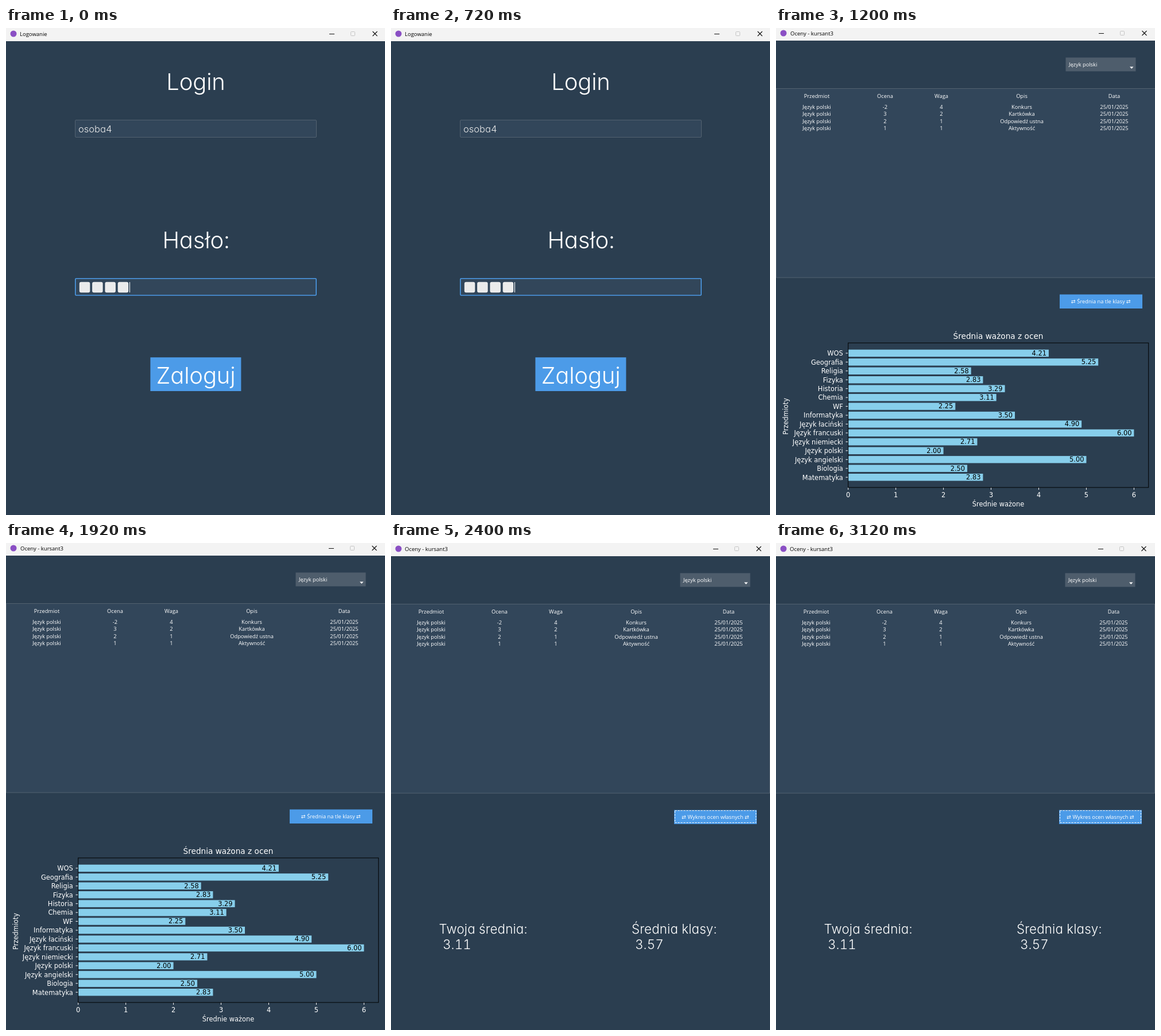
These frames come from a looping animation (660 px wide and 849 px high, 3.6 s). An HTML page:

```html
<!DOCTYPE html>
<html lang="pl">
<head>
<meta charset="utf-8">
<style>
html, body { margin: 0; width: 100%; height: 100%; overflow: hidden; background: #2b3e50; }
svg { display: block; width: 660px; height: 849px; }
text { fill: #fff; font: 9.3px "Open Sans", "Noto Sans", "DejaVu Sans", sans-serif; }
.mid { text-anchor: middle; }
.end { text-anchor: end; }
.geo { font-family: Inter, sans-serif; font-weight: 300; font-feature-settings: "cv11", "tnum"; }
.big { font-size: 40px; letter-spacing: -.004em; }
.field { font-size: 16.5px; fill: #ebebeb; }
.avg { font-size: 22.3px; letter-spacing: .008em; }
.plot { font: 11.4px "DejaVu Sans", sans-serif; }
.head { font-size: 13.65px; }
.dark { fill: #000; }
.caption { font-size: 9.5px; fill: #000; }
.box { fill: #32465a; stroke: #526170; }
</style>
</head>
<body>
<svg id="stage" viewBox="0 0 660 849"></svg>
<script>
const BLUE = '#4c9be8';
const text = (x, y, str, cls = '') => `<text x="${x}" y="${y}" class="${cls}">${str}</text>`;
const rect = (x, y, w, h, attrs) => `<rect x="${x}" y="${y}" width="${w}" height="${h}" ${attrs}/>`;
const line = (d, color, attrs = '') => `<path d="${d}" stroke="${color}" fill="none" ${attrs}/>`;

// right: x of the close cross centre, mid: y of the bar's centre line
function titleBar(label, x, right, mid) {
  return rect(0, 0, 660, mid + 12.5, 'fill="#f3f3f3"') +
    `<circle cx="13" cy="${mid - .5}" r="5.5" fill="#8a4fc4"/>` +
    text(x, mid + 3.5, label, 'caption') +
    line(`M${right - 79.5} ${mid}h9`, '#111') +
    rect(right - 42, mid - 4, 7, 7, 'rx="1" fill="none" stroke="#c4c4c4"') +
    line(`M${right - 4} ${mid - 4.5}l8 8m0-8l-8 8`, '#111', 'stroke-width="1.1"');
}

function login() {
  let out = titleBar('Logowanie', 24, 642.5, 10.5) +
    text(330.5, 108, 'Login', 'geo big mid') +
    rect(120.5, 160.5, 420, 30, 'rx="1.5" class="box"') +
    text(126, 182, 'osoba4', 'geo field') +
    text(331, 384, 'Hasło:', 'geo big mid') +
    rect(120.8, 436.8, 419.4, 29.2, `rx="1.5" fill="#32465a" stroke="${BLUE}" stroke-width="1.6"`);
  for (let i = 0; i < 4; i++)
    out += rect(127.8 + 22.3 * i, 442.8, 18.5, 18.5, 'rx="3" fill="#ebebeb"');
  return out + line('M215.5 443v18', '#fff') +
    rect(251.4, 574.2, 158, 58.8, `fill="${BLUE}"`) +
    text(330.5, 620, 'Zaloguj', 'geo big mid');
}

function grades(button) {
  const columns = [71, 190, 288, 428, 589];
  const row = (y, cells) => cells.map((cell, i) => text(columns[i], y, cell, 'mid')).join('');
  const marks = [[-2, 4, 'Konkurs'], [3, 2, 'Kartkówka'], [2, 1, 'Odpowiedź ustna'], [1, 1, 'Aktywność']];
  return rect(504.5, 51.5, 122, 24, 'fill="#4e5d6c"') +
    text(510, 67, 'Język polski') +
    '<path d="M616 67.5h6.5l-3.25 3.5z" fill="#fff"/>' +
    rect(.5, 105.5, 660, 329.6, 'class="box"') +
    row(122.3, ['Przedmiot', 'Ocena', 'Waga', 'Opis', 'Data']) +
    marks.map((m, i) => row(140.7 + 12.4 * i, ['Język polski', ...m, '25/01/2025'])).join('') +
    rect(494, 464.5, 144, 24.5, `fill="${BLUE}"`) +
    text(566, 480.3, `⇄ ${button} ⇄`, 'mid');
}

function chart() {
  const means = {
    WOS: 4.21, Geografia: 5.25, Religia: 2.58, Fizyka: 2.83, Historia: 3.29,
    Chemia: 3.11, WF: 2.25, Informatyka: 3.5, 'Język łaciński': 4.9,
    'Język francuski': 6, 'Język niemiecki': 2.71, 'Język polski': 2,
    'Język angielski': 5, Biologia: 2.5, Matematyka: 2.83
  };
  const left = 125.7, unit = 82.95;
  let out = text(387, 542, 'Średnia ważona z ocen', 'plot head mid');
  Object.entries(means).forEach(([name, mean], i) => {
    const y = 566.9 + 15.45 * i, width = mean * unit;
    out += rect(left, y - 6.2, width, 12.4, 'fill="#87ceeb"') +
      line(`M121.5 ${y}h4`, '#fff') +
      text(116.8, y + 4.3, name, 'plot end') +
      text(left + width - 4, y + 3.8, mean.toFixed(2), 'plot end dark');
  });
  for (let n = 0; n <= 6; n++) {
    const x = left + n * unit;
    out += line(`M${x} 801v4`, '#fff') + text(x, 818, n, 'plot mid');
  }
  return out + rect(125.7, 549, 523, 252, 'fill="none" stroke="#000"') +
    text(387, 834, 'Średnie ważone', 'plot mid') +
    `<g transform="translate(21 677) rotate(-90)">${text(0, 0, 'Przedmioty', 'plot mid')}</g>`;
}

function comparison() {
  return rect(494.5, 466.5, 141, 21, 'fill="none" stroke="#fff" stroke-dasharray="3 2"') +
    text(83.5, 681, 'Twoja średnia:', 'geo avg') + text(90, 708, '3.11', 'geo avg') +
    text(419, 681, 'Średnia klasy:', 'geo avg') + text(425, 708, '3.57', 'geo avg');
}

const screens = [
  login(),
  titleBar('Oceny - kursant3', 25, 641.5, 9.5) + grades('Średnia na tle klasy') + chart(),
  titleBar('Oceny - kursant3', 24, 640.5, 10.5) +
    `<g transform="translate(-1 1)">${grades('Wykres ocen własnych')}</g>` + comparison()
];
const stage = document.getElementById('stage');
stage.innerHTML = screens.map(s => `<g>${s}</g>`).join('');

const start = performance.now();
function draw() {
  const current = Math.floor((performance.now() - start) / 1200) % screens.length;
  [...stage.children].forEach((g, i) => g.style.display = i === current ? '' : 'none');
  requestAnimationFrame(draw);
}
draw();
</script>
</body>
</html>
```
